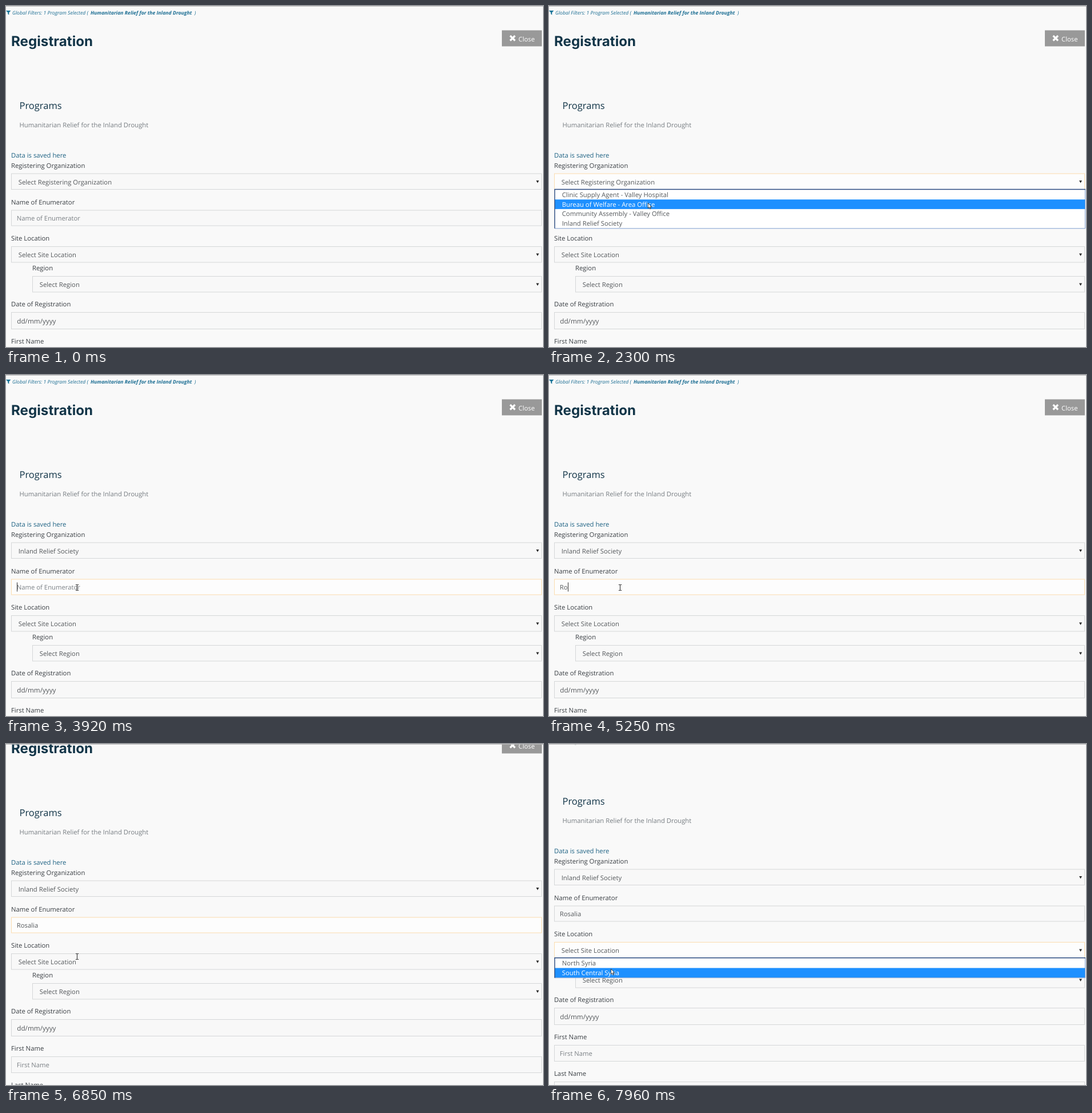
An HTML page that plays this animation: 940x596 px, repeating every 7990 ms.

```html
<!DOCTYPE html>
<html lang="en">
<head>
<meta charset="utf-8">
<title>Registration form</title>
<style>
  html, body { margin: 0; width: 100%; height: 100%; overflow: hidden; background: #f9f9f9; }
  svg { display: block; width: 940px; height: 596px; }
  text { font: 11.3px "Open Sans", "Noto Sans", sans-serif; fill: #3a3f44; white-space: pre; text-rendering: geometricPrecision; }
  .value { fill: #55595c; }
  .hint { fill: #7b8085; }
  .filter { font-size: 8.7px; font-style: italic; fill: #1d6f94; }
  .strong { font-weight: 700; }
  .title { font: 700 24.2px Inter, sans-serif; fill: #123548; }
  .heading { font-size: 16.5px; fill: #123548; }
  .program { fill: #777d82; }
  .saved { fill: #1f6384; }
  .button { fill: #fff; }
  .date { font-size: 11.7px; fill: #55595c; }
  .field { fill: #f8f8f8; stroke: #d5d7d8; }
  .field.focus { fill: #fdfdfd; stroke: #fbdcae; }
  .hover { fill: #1e90ff; }
  text.on { fill: #fff; }
</style>
</head>
<body>
<svg id="stage" viewBox="0 0 940 596"></svg>
<script>
const LOOP = 7990, SCROLL = 74, ROW = 16.7;
const PROGRAM = 'Humanitarian Relief for the Inland Drought';
const ORG = 'Inland Relief Society';
const PERSON = 'Rosalia';
const KEY_TIMES = [5040, 5250, 5340, 5500, 5700, 5760, 5820];

// Pointer tip: time, x, y
const PATH = [
  [500, -8, 428], [800, 60, 401], [1000, 126, 386], [1280, 218, 314], [1340, 219, 314],
  [2180, 219, 314], [2290, 178, 340], [2400, 126, 378], [3620, 126, 378], [3650, 124, 371],
  [7099, 124, 371], [7100, 124, 369], [7300, 132, 361.5], [7770, 132, 361.5], [7960, 108, 392.5]
];

const stage = document.getElementById('stage');

function add(parent, tag, attrs = {}, content = '') {
  const el = document.createElementNS('http://www.w3.org/2000/svg', tag);
  for (const k in attrs) el.setAttribute(k, attrs[k]);
  el.textContent = content;
  parent.append(el);
  return el;
}
const text = (parent, x, y, content, cls = '') => add(parent, 'text', { x, y, class: cls }, content);
const rect = (parent, x, y, width, height, attrs) => add(parent, 'rect', { x, y, width, height, ...attrs });
const path = (parent, d, attrs) => add(parent, 'path', { d, ...attrs });
const show = (el, on) => el.setAttribute('visibility', on ? 'visible' : 'hidden');

const page = add(stage, 'g');

function field(x, y, h) {
  return rect(page, x + .5, y + .5, 928 - (x - 9), h - 1, { class: 'field' });
}
function select(x, y, content) {
  const box = field(x, y, 28.5);
  path(page, `M928 ${y + 12.5}h5l-2.5 4.5z`, { fill: '#2b2b2b' });
  return { box, value: text(page, x + 12.7, y + 19, content, 'value') };
}
function list(top, items) {
  const g = add(stage, 'g'), h = items.length * ROW + 1.5, bottom = top + h;
  rect(g, 9.5, top, 929, h, { fill: '#fff' });
  const bar = rect(g, 10, 0, 928.5, ROW, { class: 'hover' });
  const labels = items.map((s, i) => text(g, 22.7, top + 13.5 + i * ROW, s, 'value'));
  path(g, `M938.5 ${top}V${bottom}H10`, { fill: 'none', stroke: '#7f9fd0' });
  path(g, `M10 ${bottom}V${top}H939`, { fill: 'none', stroke: '#2a4a80', 'stroke-width': 1.4 });
  return (open, y) => {
    const row = Math.floor((y - top - 1) / ROW);
    const over = open && row >= 0 && row < items.length;
    show(g, open);
    show(bar, over);
    bar.setAttribute('y', top + 1 + row * ROW);
    labels.forEach((el, i) => el.classList.toggle('on', over && i === row));
  };
}

// Page header
path(page, 'M0 8H8.4L5.3 11.6V15.6L3.2 14V11.6Z', { fill: '#1a7599' });
text(page, 11, 15, 'Global Filters: 1 Program Selected (', 'filter');
text(page, 148, 15, PROGRAM, 'filter strong');
text(page, 330, 15, ')', 'filter');
text(page, 9, 70, 'Registration', 'title');
rect(page, 868, 42.5, 70, 28, { fill: '#999' });
path(page, 'M882.5 52l8.5 8.5m0 -8.5l-8.5 8.5', { stroke: '#fff', 'stroke-width': 3.2 });
text(page, 897, 61.5, 'Close', 'button');
text(page, 23.5, 180, 'Programs', 'heading');
text(page, 23.5, 212, PROGRAM, 'program');
text(page, 9, 265, 'Data is saved here', 'saved');

// Form
[[9, 283, 'Registering Organization'], [9, 346.5, 'Name of Enumerator'], [9, 410, 'Site Location'],
 [46, 462, 'Region'], [9, 525, 'Date of Registration'], [9, 590, 'First Name'], [9, 654, 'Last Name']]
  .forEach(([x, y, s]) => text(page, x, y, s));
const org = select(9, 292.5, '');
const nameBox = field(9, 356.5, 28);
const nameText = text(page, 18.7, 375, '');
const caret = rect(page, 19, 362.5, 1, 16, { fill: '#333' });
const site = select(9, 420, 'Select Site Location');
select(46, 472, 'Select Region');
field(9, 535, 30);
text(page, 19.3, 555, 'dd/mm/yyyy', 'date');
field(9, 600, 29);
text(page, 18.7, 619, 'First Name', 'hint');
field(9, 664, 29);

rect(stage, 0, 0, 940, 1, { fill: '#b9b9b9' });

const orgList = list(320.5, [
  'Clinic Supply Agent - Valley Hospital',
  'Bureau of Welfare - Area Office',
  'Community Assembly - Valley Office',
  ORG
]);
const siteList = list(373.8, ['North Syria', 'South Central Syria']);

const arrow = path(stage, 'M.5 .5V9.6L2.6 7.8L4 11L5.4 10.4L4 7.3H6.8Z',
  { fill: '#fff', stroke: '#333', 'stroke-width': .9 });
const beam = path(stage, 'M-2.5 -5H-.5L0 -4.5L.5 -5H2.5M0 -4.5V4.5M-2.5 5H-.5L0 4.5L.5 5H2.5',
  { fill: 'none', stroke: '#222' });

function pointer(t) {
  const i = PATH.findIndex(p => p[0] > t);
  if (i < 0) return PATH[PATH.length - 1].slice(1);
  if (i === 0) return PATH[0].slice(1);
  const [t0, x0, y0] = PATH[i - 1], [t1, x1, y1] = PATH[i];
  const p = (t - t0) / (t1 - t0);
  return [x0 + (x1 - x0) * p, y0 + (y1 - y0) * p];
}

function scrollAt(t) {
  if (t < 6680) return 0;
  const p = Math.min(1, (t - 6660) / 290);
  return Math.round(SCROLL * p * p * (3 - 2 * p));
}

function draw(t) {
  const [x, y] = pointer(t);
  const typed = KEY_TIMES.filter(k => k <= t).length;
  const inName = t >= 3850 && t < 7400;

  page.setAttribute('transform', `translate(0 ${-scrollAt(t)})`);
  org.value.textContent = t < 2770 ? 'Select Registering Organization' : ORG;
  org.box.classList.toggle('focus', t >= 1610 && t < 3850);
  nameBox.classList.toggle('focus', inName);
  site.box.classList.toggle('focus', t >= 7400);

  nameText.textContent = typed ? PERSON.slice(0, typed) : 'Name of Enumerator';
  nameText.setAttribute('class', typed ? 'value' : 'hint');
  caret.setAttribute('x', 19 + (typed ? Math.round(nameText.getComputedTextLength()) : 0));
  show(caret, inName && !(t >= 4350 && t < 4880) && !(t >= 6350 && t < 6950));

  orgList(t >= 1610 && t < 2770, y);
  siteList(t >= 7430, y);

  const overName = t >= 3635 && t < 7100;
  show(arrow, t >= 500 && !overName);
  show(beam, overName);
  arrow.setAttribute('transform', `translate(${x} ${y})`);
  beam.setAttribute('transform', `translate(${x + .5} ${y + .5})`);
}

const start = performance.now();
function tick() {
  draw((performance.now() - start) % LOOP);
  requestAnimationFrame(tick);
}
tick();
</script>
</body>
</html>
```
